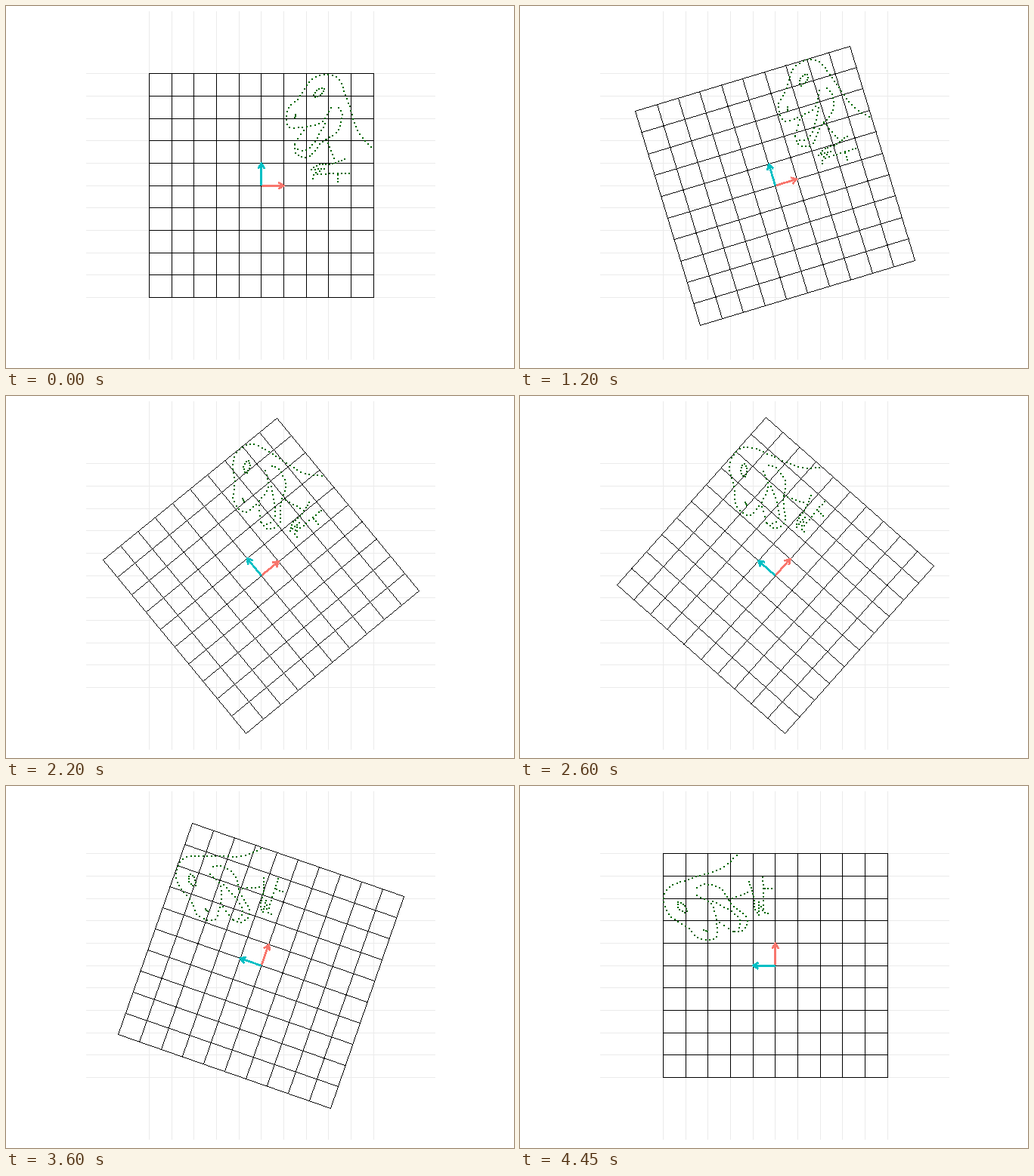
Recreate the animation shown at these times as an HTML page with a canvas. Size 672 by 480 pixels, loop 5 s.

```html
<!DOCTYPE html>
<html lang="en">
<head>
<meta charset="utf-8">
<title>Rotating grid</title>
<style>
  html, body { margin: 0; width: 100%; height: 100%; overflow: hidden; background: #fff; }
  canvas { display: block; }
</style>
</head>
<body>
<canvas id="stage" width="672" height="480"></canvas>
<script>
const ctx = document.getElementById("stage").getContext("2d");
const LOOP = 5000, STEP = 50, TURN_START = 550, TURN_STEPS = 80;
const CX = 337.75, CY = 238.2, UNIT = 29.68, HALF = 5;
const DOT_SCALE = HALF / 99.5;

// Evenly spaced dots along a smooth curve through a few key points.
function dotted(count, ...keys) {
  const trail = [];
  const FINE = 40;
  for (let i = 0; i < keys.length - 1; i++) {
    const before = keys[Math.max(0, i - 1)], after = keys[Math.min(keys.length - 1, i + 2)];
    for (let k = 0; k <= FINE; k++) {
      trail.push([0, 1].map(axis =>
        spline(before[axis], keys[i][axis], keys[i + 1][axis], after[axis], k / FINE)));
    }
  }
  const lengths = [0];
  for (let i = 1; i < trail.length; i++) {
    lengths.push(lengths[i - 1] +
      Math.hypot(trail[i][0] - trail[i - 1][0], trail[i][1] - trail[i - 1][1]));
  }
  const total = lengths[lengths.length - 1];
  return Array.from({ length: count }, (_, n) => {
    const wanted = total * n / (count - 1) - 1e-6;
    return trail[lengths.findIndex(length => length >= wanted)].map(v => v * DOT_SCALE);
  });
}

function spline(a, b, c, d, u) {
  const m = (c - a) / 2, n = (d - b) / 2;
  return b + u * (m + u * (3 * (c - b) - 2 * m - n + u * (2 * (b - c) + m + n)));
}

const outline = dotted(52, [98, 34], [86, 48], [77, 75], [69, 94], [57, 98.5], [44, 93],
  [34, 78], [24, 68], [23, 55], [30, 51], [53, 55.5], [62, 69]);
const upperLip = dotted(11, [57, 55], [48, 39], [40, 31], [33, 32]);
const mouth = dotted(4, [30, 37], [38, 49]);
const lowerJaw = dotted(23, [30, 36], [31, 28], [42, 25], [54, 38], [68, 48], [72, 62], [69, 69]);
const eye = dotted(11, [47, 80], [50, 85], [56, 86], [54, 81], [48, 78]);
const nostril = dotted(3, [30, 60], [31, 63]);
const chest = dotted(6, [58, 41], [65, 24]);
const arm = dotted(12, [74, 23], [62, 19], [51, 18], [45, 14]);
const fingers = [
  dotted(5, [45, 14], [56, 14.5]),
  dotted(4, [52, 12.5], [47, 10], [46, 6]),
  dotted(9, [50, 10], [78, 10.7]),
  dotted(3, [68, 9], [68, 3])
];
const dots = [outline, upperLip, mouth, lowerJaw, eye, nostril, chest, arm, ...fingers].flat();

// Crisp one-pixel line without smoothing.
function pixelLine([x0, y0], [x1, y1]) {
  x0 = Math.floor(x0);
  y0 = Math.floor(y0);
  const dx = Math.floor(x1) - x0, dy = Math.floor(y1) - y0;
  const n = Math.max(Math.abs(dx), Math.abs(dy));
  for (let i = 0; i <= n; i++) {
    ctx.fillRect(Math.round(x0 + dx * i / n), Math.round(y0 + dy * i / n), 1, 1);
  }
}

// Crisp open arrow from the centre, one unit long.
function arrow(angle, color) {
  const ux = Math.cos(angle), uy = -Math.sin(angle);
  const radius = 1.4, head = 8.5, hx = head * Math.cos(Math.PI / 6), hy = head / 2;
  const inBar = (along, across, length) =>
    along >= 0 && along <= length && Math.abs(across) <= radius;
  const reach = Math.ceil(UNIT) + 4;
  ctx.fillStyle = color;
  for (let y = -reach; y <= reach; y++) {
    for (let x = -reach; x <= reach; x++) {
      const px = Math.floor(CX) + x, py = Math.floor(CY) + y;
      const qx = px + 0.5 - CX, qy = py + 0.5 - CY;
      const along = qx * ux + qy * uy;
      const across = Math.abs(qy * ux - qx * uy);
      const back = UNIT - along;
      if (inBar(along, across, UNIT) || Math.hypot(back, across) <= radius ||
          inBar((back * hx + across * hy) / head, (across * hx - back * hy) / head, head)) {
        ctx.fillRect(px, py, 1, 1);
      }
    }
  }
}

function angleAt(time) {
  if (time < TURN_START) return 0;
  const step = Math.min(TURN_STEPS, Math.floor(time / STEP) - 9);
  return step / TURN_STEPS * Math.PI / 2;
}

function draw(time) {
  const angle = angleAt(time), cos = Math.cos(angle), sin = Math.sin(angle);
  const place = (x, y) => [
    CX + UNIT * (x * cos - y * sin),
    CY - UNIT * (x * sin + y * cos)
  ];

  ctx.fillStyle = "#fff";
  ctx.fillRect(0, 0, 672, 480);

  ctx.fillStyle = "#ebebeb";
  for (let i = -HALF; i <= HALF; i++) {
    ctx.fillRect(Math.floor(CX + i * UNIT), 7, 1, 462);
    ctx.fillRect(106, Math.floor(CY + i * UNIT), 462, 1);
  }

  ctx.fillStyle = "#000";
  for (let i = -HALF; i <= HALF; i++) {
    pixelLine(place(i, -HALF), place(i, HALF));
    pixelLine(place(-HALF, i), place(HALF, i));
  }

  arrow(angle, "#f8766d");
  arrow(angle + Math.PI / 2, "#00bfc4");

  ctx.fillStyle = "#006400";
  for (const [x, y] of dots) {
    const [px, py] = place(x, y);
    ctx.fillRect(Math.floor(px - 1), Math.floor(py - 1), 2, 2);
  }
}

const start = performance.now();
function tick() {
  draw((performance.now() - start) % LOOP);
  requestAnimationFrame(tick);
}
tick();
</script>
</body>
</html>
```
